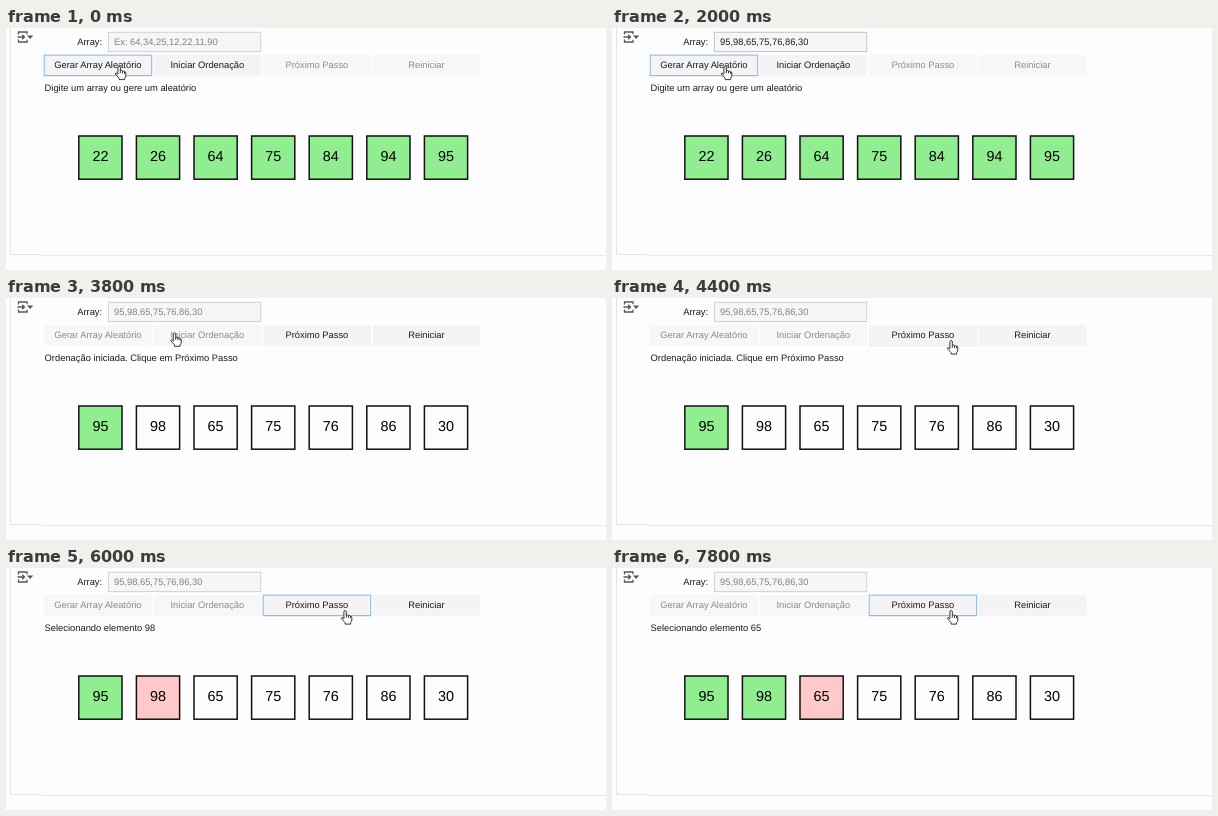
These frames come from a looping animation (600x242 px, 8000 ms). An HTML page:

```html
<!DOCTYPE html>
<html lang="pt">
<head>
<meta charset="utf-8">
<style>
  html, body { margin: 0; width: 100%; height: 100%; overflow: hidden; background: #fdfcfe; }
  svg { display: block; font: 9.36px "Liberation Sans", Arial, sans-serif; text-rendering: geometricPrecision; }
</style>
</head>
<body>
<svg id="stage" width="600" height="242" viewBox="0 0 600 242"></svg>
<script>
const LOOP = 8000;
const LABELS = ["Gerar Array Aleatório", "Iniciar Ordenação", "Próximo Passo", "Reiniciar"];
const OLD = [22, 26, 64, 75, 84, 94, 95];
const ARRAY = [95, 98, 65, 75, 76, 86, 30];
const GREEN = "#90ee90", PINK = "#ffc9c9", PAPER = "#fdfcfe";

// Each entry changes only the listed parts of the state.
const EVENTS = [
  [0, { input: "", values: OLD, sorted: 7, picked: -1, started: false, focus: 0, hover: 0,
        pressed: -1, hand: [113.1, 37.8], message: "Digite um array ou gere um aleatório" }],
  [200, { input: ARRAY.join() }],
  [2400, { hover: 1, hand: [168.5, 34.5] }],
  [2600, { focus: 1, pressed: 1 }],
  [2800, { pressed: -1 }],
  [3800, { started: true, focus: -1, values: ARRAY, sorted: 1,
           message: "Ordenação iniciada. Clique em Próximo Passo" }],
  [4400, { hover: 2, hand: [339.1, 42.3] }],
  [5000, { focus: 2 }],
  [5600, { pressed: 2, picked: 1, message: "Selecionando elemento 98" }],
  [6000, { pressed: -1 }],
  [6800, { pressed: 2, picked: -1, sorted: 2, message: "Elemento 98 inserido na posição 1" }],
  [7000, { pressed: -1 }],
  [7800, { picked: 2, message: "Selecionando elemento 65" }]
];

const rect = (x, y, w, h, fill, stroke = "none", width = 1) =>
  `<rect x="${x}" y="${y}" width="${w}" height="${h}" fill="${fill}" stroke="${stroke}" stroke-width="${width}"/>`;
const text = (x, y, str, fill = "#1c1c1c", extra = "") =>
  `<text x="${x}" y="${y}" fill="${fill}" ${extra}>${str}</text>`;
const MIDDLE = 'text-anchor="middle"';

function page() {
  return rect(0, 0, 600, 242, PAPER) +
    `<path d="M4.5 0V226.5H35" fill="none" stroke="#e4e3e8"/>
     <path d="M35 227.5H600" stroke="#e9e8ed"/>
     <path d="M12.5 6.5V4H21V6.3M21 11.7V14H12.5V11.5M11.5 9H18.3M16.2 6.7L18.5 9L16.2 11.3"
       fill="none" stroke="#555" stroke-width="1.3"/>
     <path d="M21 7.6H27.2L24.1 10.9Z" fill="#555"/>`;
}

function field(s) {
  const grey = s.started || !s.input;
  return text(71.2, 17.1, "Array:") +
    rect(102.4, 4.3, 152.3, 19.3, "#f6f5f7", grey ? "#d2d2d4" : "#c6c6c8") +
    text(108, 17.1, s.input || "Ex: 64,34,25,12,22,11,90", grey ? "#828282" : "#1c1c1c");
}

function button(s, i) {
  const x = 38.2 + i * 109.5, enabled = s.started === i > 1;
  const fill = !enabled ? "#f7f6f8" : s.pressed === i ? "#dedee0" : "#f4f3f5";
  const shadow = enabled && s.hover === i ? rect(x, 28, 107.5, 20.5, "#eae9ec") : "";
  const outline = s.focus === i ? rect(x, 27.1, 107.5, 20.5, "none", "#84b9e6") : "";
  return shadow + rect(x, 27, 107.5, 20.7, fill) + outline +
    text(x + 53.7, 40.2, LABELS[i], enabled ? "#1c1c1c" : "#8c8c8c", MIDDLE);
}

function cell(s, value, i) {
  const x = 72.8 + i * 57.6;
  const fill = i === s.picked ? PINK : i < s.sorted ? GREEN : PAPER;
  return rect(x, 108, 43.2, 43.2, fill, "#111", 1.5) +
    text(x + 21.6, 133.1, value, "#000", MIDDLE + ' font-size="14.4"');
}

function hand([x, y]) {
  return `<path transform="translate(${x} ${y})" fill="#fff" stroke="#222" stroke-width=".9" stroke-linejoin="round"
    d="M-1.2 8.5V1Q0-.8 1.2 1V5Q2.5 4 3.4 5.3Q4.8 4.7 5.4 6Q6.7 5.8 6.7 7.2V9.6Q6.7 11.5 5.5 12.4V13.8H0V12.4L-3.8 8.2Q-3.6 6.2-1.2 8.5Z
       M1.2 5V7.4M3.4 5.3V7.6M5.4 6V8"/>`;
}

const stage = document.getElementById("stage");
let shown = -1;

function frame() {
  const t = performance.now() % LOOP;
  const past = EVENTS.filter(([at]) => at <= t);
  if (past.length !== shown) {
    shown = past.length;
    const s = Object.assign({}, ...past.map(e => e[1]));
    stage.innerHTML = page() + field(s) +
      LABELS.map((_, i) => button(s, i)).join("") +
      text(38.6, 63.1, s.message) +
      s.values.map((v, i) => cell(s, v, i)).join("") +
      hand(s.hand);
  }
  requestAnimationFrame(frame);
}
frame();
</script>
</body>
</html>
```
